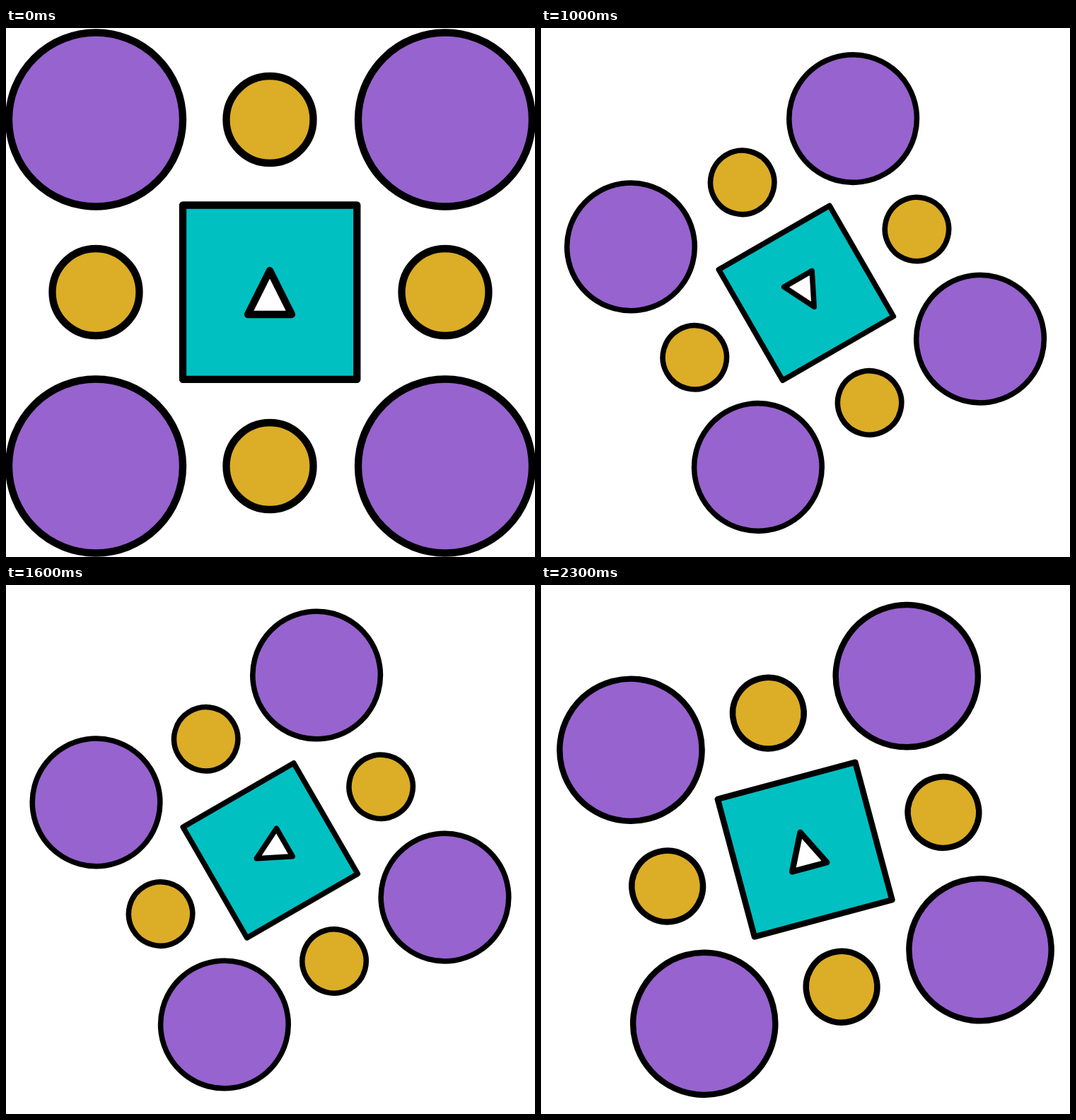
Animation of 748x748 px, one loop 2400 ms. Source, as an HTML page:

```html
<!DOCTYPE html>
<html lang="en">
<head>
<meta charset="utf-8">
<title>Turning shapes</title>
<style>
  html, body { margin: 0; width: 100%; height: 100%; overflow: hidden; background: #fff; }
  svg { display: block; width: 748px; height: 748px; }
  #shapes { stroke: #000; stroke-width: 10.3; stroke-linejoin: round; }
  .big { fill: #9763cf; }
  .small { fill: #dcad26; }
  .square { fill: #00c0c2; }
  .pointer { fill: #fff; }
</style>
</head>
<body>
<svg viewBox="0 0 748 748">
  <g id="shapes">
    <g class="big">
      <circle cx="-247" cy="-245" r="123"/>
      <circle cx="247" cy="-245" r="123"/>
      <circle cx="247" cy="245" r="123"/>
      <circle cx="-247" cy="245" r="123"/>
    </g>
    <g class="small">
      <circle cx="-1" cy="-245" r="61.5"/>
      <circle cx="247" cy="-1" r="61.5"/>
      <circle cx="-1" cy="245" r="61.5"/>
      <circle cx="-247" cy="-1" r="61.5"/>
    </g>
    <rect class="square" x="-124" y="-124" width="246.3" height="246.3"/>
    <path class="pointer" d="M-1-31.5L30 30.5H-32Z"/>
  </g>
</svg>
<script>
  const STEPS = 24, STEP_MS = 100;
  const HALF_W = 247, HALF_H = 245;
  const shapes = document.getElementById('shapes');
  const start = performance.now();

  // Shrinks the turned layout so its outer centres stay in a fixed box.
  function fitScale(deg) {
    const a = deg * Math.PI / 180;
    const c = Math.abs(Math.cos(a)), s = Math.abs(Math.sin(a));
    return HALF_W / Math.max(HALF_W * c + HALF_H * s, HALF_W * s + HALF_H * c);
  }

  function draw(now) {
    const step = Math.floor(Math.max(0, now - start) / STEP_MS) % STEPS;
    const deg = step * 360 / STEPS;
    shapes.setAttribute('transform',
      `translate(374 374.5) rotate(${deg}) scale(${fitScale(deg)})`);
    requestAnimationFrame(draw);
  }

  draw(start);
</script>
</body>
</html>
```
